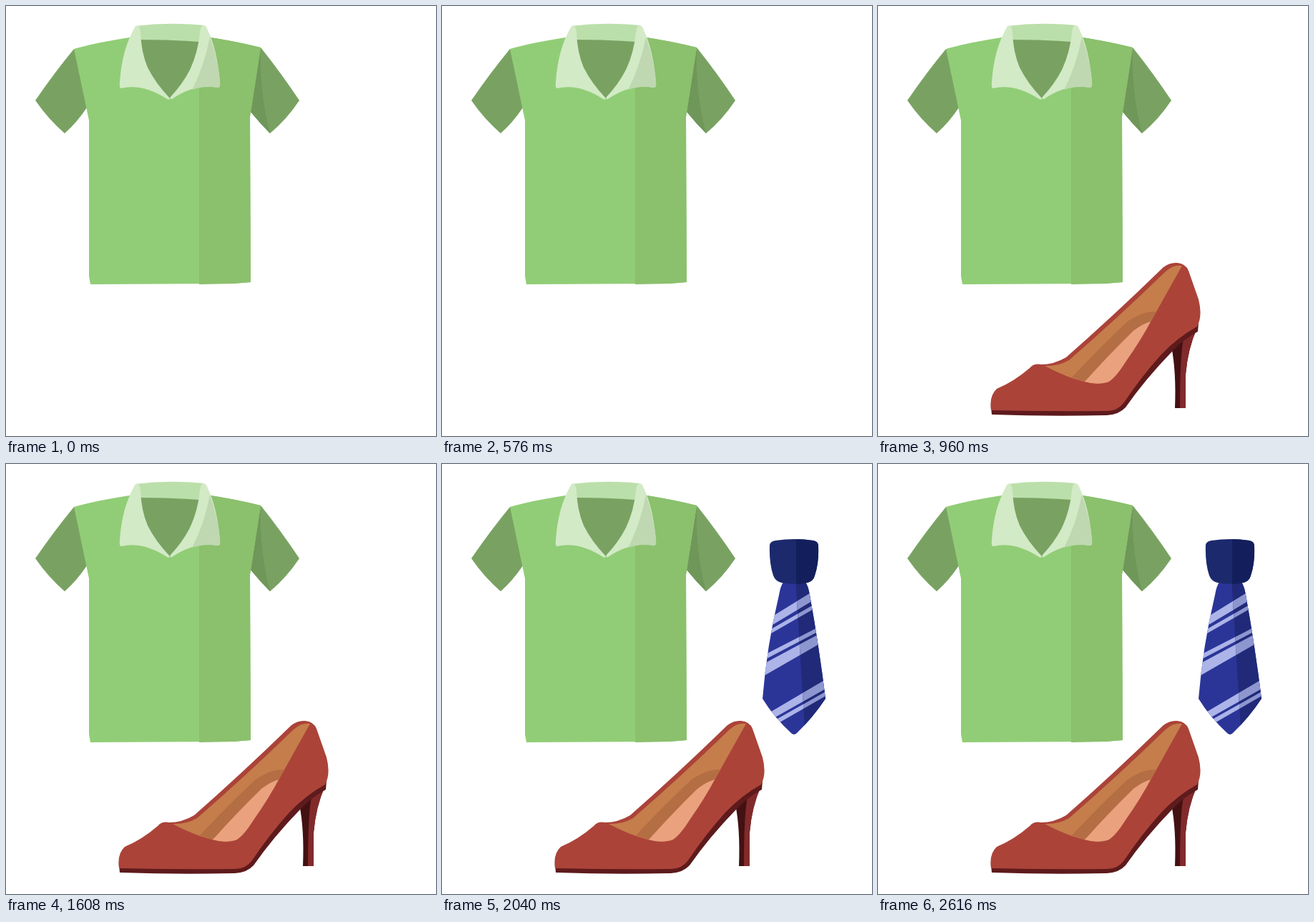
Write an HTML page without scripts that moves like this. It is 601 px wide and 601 px high and loops after 3 s.

```html
<!DOCTYPE html>
<html lang="en">
<head>
<meta charset="utf-8">
<title>Clothes</title>
<style>
  html, body { margin: 0; width: 100%; height: 100%; overflow: hidden; background: #fff; }
  svg { display: block; width: 100%; height: 100%; }
  .shoe { animation: shoe 3s step-end infinite; }
  .tie { animation: tie 3s step-end infinite; }
  @keyframes shoe { 0% { opacity: 0; } 32%, 100% { opacity: 1; } }
  @keyframes tie { 0% { opacity: 0; } 68%, 100% { opacity: 1; } }
</style>
</head>
<body>
<svg viewBox="0 0 601 601">
  <defs>
    <clipPath id="blade">
      <path d="M477 165H508Q512 171 514 183Q527 255 536 328Q518 355 496 376Q492 380 488 376Q464 354 448 328Q454 254 471 183Q473 171 477 165Z"/>
    </clipPath>
    <clipPath id="shade"><path d="M494 160H545V385H508Z"/></clipPath>
    <path id="stripes" d="M460 214L520 177V190L460 226ZM456 233L524 194V200L456 239Z
      M450 267L530 226V232L450 274ZM450 279L530 236V250L450 296Z
      M455 349L540 299V312L455 360ZM460 361L540 316V322L460 368Z"/>
  </defs>

  <g class="shirt">
    <path fill="#79a262" d="M95 60Q67 94 41 132Q59 158 82 178Q99 163 113 142L118 100Z"/>
    <path fill="#79a262" d="M356 58Q384 93 410 132Q392 159 369 178Q355 164 342 148L345 100Z"/>
    <path fill="#6f9759" d="M356 58Q354 120 369 178Q355 164 342 148L345 100Z"/>
    <path fill="#91cd76" d="M95 60Q130 50 180 43H280Q320 49 356 58L341 155L342 386L318 388L118 389L116 378V160Z"/>
    <path fill="#8bc06d" d="M270 43H280Q320 49 356 58L341 155L342 386L318 388L270 389Z"/>
    <path fill="#79a262" d="M185 44H276L262 95L229 130L195 95Z"/>
    <path fill="#bbdfaa" d="M181 28Q228 22 276 27L270 50Q230 47 188 47Z"/>
    <path fill="#d2eac6" d="M181 28Q187 25 188 37Q189 65 198 86Q209 108 229 129Q229 132 225 130Q191 108 161 115Q158 115 159 106Q162 60 181 28Z"/>
    <path fill="#d2eac6" d="M276 27Q272 27 271 38Q268 65 258 87Q248 108 230 127Q228 131 232 130Q264 108 296 114Q300 114 299 106Q295 60 282 34Q280 27 276 27Z"/>
    <path fill="#bfd8b1" d="M285 43Q296 73 299 106Q300 114 296 114Q277 111 260 117Q277 85 285 43Z"/>
  </g>

  <g class="shoe">
    <path fill="#431112" d="M410 476L446 450Q433 479 430 515V562H415Q417 510 410 476Z"/>
    <path fill="#822a2b" d="M427 465L446 450Q433 479 430 515V562H422Q422 490 427 465Z"/>
    <path fill="#5e1a1c" d="M158 560L159 571Q240 574 320 572Q337 571 346 561Q374 521 411 483Q427 466 447 455L448 443L390 470L330 545Z"/>
    <path fill="#ab4339" d="M158 565Q155 545 166 535Q190 525 212 506Q218 499 228 501Q246 501 263 491Q328 434 399 365Q408 358 418 359Q430 360 434 370L448 410Q454 433 446 448Q419 463 396 487Q368 518 344 554Q335 566 321 566Q240 567 158 565Z"/>
    <path fill="#c57d4b" d="M233 503Q251 504 267 495Q334 437 402 371Q413 361 425 363Q407 395 387 431Q367 466 347 496Q330 523 320 526Q306 530 288 525Q263 519 233 503Z"/>
    <path fill="#b46e44" d="M271 519Q315 472 350 440Q371 426 389 427L375 453L288 525Z"/>
    <path fill="#eaa17e" d="M289 525Q324 486 357 454Q370 444 381 441Q367 468 347 496Q330 523 320 526Q306 530 289 525Z"/>
  </g>

  <g class="tie">
    <g clip-path="url(#blade)">
      <path fill="#2b3598" d="M440 160H545V385H440Z"/>
      <use href="#stripes" fill="#acb4e8"/>
      <g clip-path="url(#shade)">
        <path fill="#212a78" d="M490 160H545V385H490Z"/>
        <use href="#stripes" fill="#8d96cf"/>
      </g>
    </g>
    <path fill="#1c2a6d" d="M458 113Q459 108 466 107Q492 103 519 107Q526 108 526 115Q527 138 521 156Q519 164 510 166Q492 169 475 166Q466 164 463 156Q457 138 458 113Z"/>
    <path fill="#131f5c" d="M495 105Q507 105 519 107Q526 108 526 115Q527 138 521 156Q519 164 510 166Q502 168 495 168Z"/>
  </g>
</svg>
</body>
</html>
```
